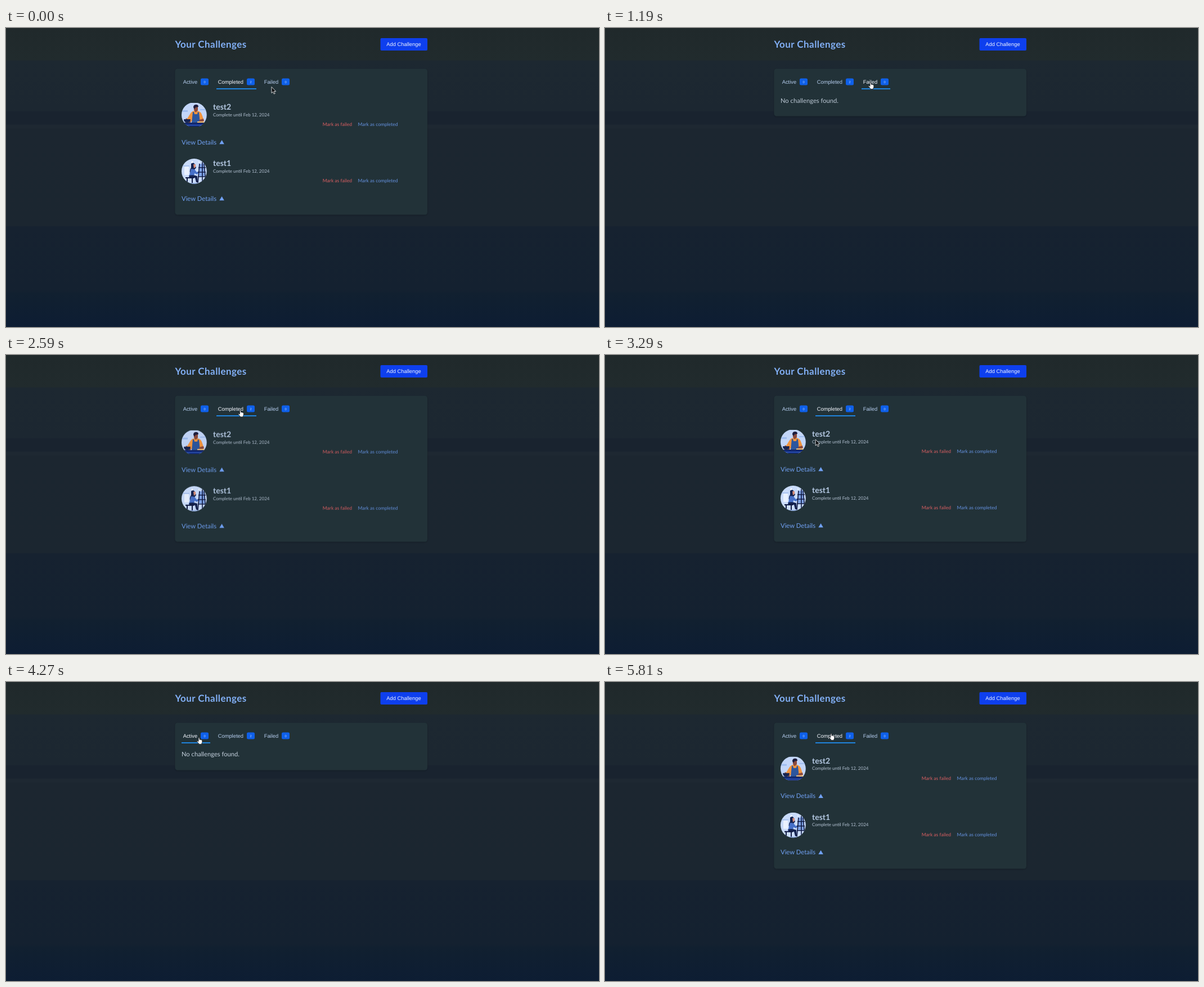
Animation of 1054x531 px, one loop 5880 ms. Source, as an HTML page:

```html
<!DOCTYPE html>
<html lang="en">
<head>
<meta charset="utf-8">
<title>Your Challenges</title>
<style>
  html, body { margin: 0; width: 100%; height: 100%; overflow: hidden; background: #1b2530; }
  svg { display: block; width: 1054px; height: 531px; font-family: Lato, sans-serif; text-rendering: geometricPrecision; }
  .ui { font-family: "Liberation Sans", Arial, sans-serif; font-size: 9.35px; }
  .badge { font-size: 5.8px; fill: #b8d4ff; text-anchor: middle; }
  .title { font-size: 17px; font-weight: 700; letter-spacing: .45px; fill: #82b0f6; }
  .name { font-size: 14px; font-weight: 700; fill: #b4c8e2; }
  .date { font-size: 8px; fill: #b3c1d2; }
  .mark { font-size: 8.5px; }
  .more { font-size: 11.3px; fill: #70a0f2; }
  .none { font-size: 11.2px; fill: #c5d1de; }
</style>
</head>
<body>
<svg viewBox="0 0 1054 531">
  <defs>
    <linearGradient id="bg" gradientUnits="userSpaceOnUse" x1="0" y1="0" x2="0" y2="531"></linearGradient>
    <filter id="shadow" x="-5%" y="-5%" width="110%" height="115%">
      <feDropShadow dx="0" dy="1" stdDeviation="1.5" flood-opacity=".25"/>
    </filter>
    <clipPath id="round"><circle cx="22.4" cy="22.4" r="22.4"/></clipPath>
    <g id="cook" clip-path="url(#round)">
      <path d="M0 1h45v42H0z" fill="#c3d6f9"/>
      <path d="M2 14h9v3H2zM33 12h10v2H33z" fill="#9fbdf0"/>
      <path d="M15 21q3-6 9-6h4q7 1 9 9l3 9-7 2-17-1-8 1q-2-3 2-6z" fill="#f2953f"/>
      <path d="M20 17l2 0 1 4h5l1-4 2 1 2 19H18z" fill="#2c569e"/>
      <path d="M8 28l4 3 5 3-2 3-8-5zM31 31l8-2 1 4-8 3z" fill="#8b4a3c"/>
      <path d="M22 7q4-3 7 1v6q-2 4-5 3-3-3-2-10z" fill="#8b4a3c"/>
      <path d="M21 9q0-5 5-5 4 0 4 4l-5 1-2 3z" fill="#1d1c3d"/>
      <path d="M4 30h12q0 6-6 6T4 30zM2 36h41v3H2z" fill="#172451"/>
      <path d="M28 34h12v2H28z" fill="#f5c27a"/>
      <path d="M0 37h45v6H0z" fill="#122a78"/>
      <path d="M8 40h29v1H8z" fill="#3a67cf"/>
    </g>
    <g id="painter" clip-path="url(#round)">
      <path d="M0 0h45v45H0z" fill="#c9dbfb"/>
      <path d="M5 13h8v16H5z" fill="#e9f1ff"/>
      <path d="M3 12h11v2H3z" fill="#a9c3f0"/>
      <circle cx="19" cy="6" r="1.5" fill="#fff"/><circle cx="31" cy="6" r="1" fill="#fff"/>
      <path d="M17 9q5-4 7 2l2 5-4 5-1 7-6-3q-1-5 2-9z" fill="#14224f"/>
      <path d="M21 10h4v5l-3 2z" fill="#d98f7c"/>
      <path d="M17 18l6 1 4 5 5-2 1 2-6 4-4-2-1 8-9-1z" fill="#4670c8"/>
      <path d="M13 30q8-2 15 1l1 11h-3l-2-8-9 1z" fill="#14224f"/>
      <path d="M7 33h15v2H7zM9 35h2v9H9zM18 35h2v9h-2z" fill="#101a42"/>
      <path d="M31 10l9-2 1 24-11-1z" fill="#7fa3e6"/>
      <path d="M32 9l-3 34M37 6v38M40 9l3 31M30 16h13M29 24h14M29 32h15" fill="none" stroke="#101a42" stroke-width="1.6"/>
      <path d="M0 43h45v2H0z" fill="#8fade4"/>
    </g>
  </defs>
  <rect width="1054" height="531" fill="url(#bg)"/>
  <text class="title" x="300.5" y="35">Your Challenges</text>
  <rect x="665.5" y="18" width="83.5" height="22" rx="2" fill="#0e3fee"/>
  <text class="ui" x="676.3" y="32.2" fill="#eef3ff">Add Challenge</text>
  <rect id="panel" x="300.5" y="72.5" width="448.5" rx="4.5" fill="#203238" filter="url(#shadow)"/>
  <g id="tabs"></g>
  <rect id="line" y="107" height="2" fill="#2083dc"/>
  <g id="list"></g>
  <text id="none" class="none" x="312" y="132">No challenges found.</text>
  <g id="pointer" stroke="#14181c" stroke-width=".8" stroke-linejoin="round" fill="#fff">
    <path id="arrow" stroke="#fff" fill="#0b0d10" d="M0 0v11l2.5-2.3 1.7 3.9 1.9-.8-1.7-3.8h3.3z"/>
    <path id="hand" d="M-1 0q1-1 2 0v3.2q1-.6 1.8.2 1-.4 1.7.5 1.2-.2 1.3 1v2.6q0 1-1 2.6v1.3h-5.200v-1.100l-3.300-3.700q-.3-1.300 1-1.100l1.700 1.100z"/>
  </g>
</svg>
<script>
const $ = id => document.getElementById(id);
const LOOP = 5880;

// offset in px, colour
const bands = [[0, '#20292b'], [57, '#212b2d'], [58, '#1d2831'], [147, '#1c2731'], [149, '#19232f'], [171, '#19232f'],
  [172, '#1e2832'], [178, '#1e2832'], [179, '#1c2630'], [351, '#1b2630'], [353, '#162230'], [465, '#142130'],
  [472, '#11203000'.slice(0, 7)], [531, '#0d1d33']];
$('bg').innerHTML = bands.map(([y, c]) => `<stop offset="${y / 531}" stop-color="${c}"/>`).join('');

const tabs = [
  { label: 'Active', count: 0, x: 312, w: 51 },
  { label: 'Completed', count: 2, x: 374, w: 71 },
  { label: 'Failed', count: 0, x: 456, w: 51 }
];
$('tabs').innerHTML = tabs.map(({ label, count, x, w }) => {
  const right = x + w - 3;
  return `<text class="ui label" x="${x + 2.7}" y="99">${label}</text>
    <rect x="${right - 14}" y="89.500" width="14" height="12" rx="2.500" fill="#0f60e9"/>
    <text class="ui badge" x="${right - 7}" y="97.600">${count}</text>`;
}).join('');
const labels = document.querySelectorAll('.label');

const item = (y, name, art) => `<g transform="translate(312 ${y})">
  <use href="#${art}"/>
  <text class="name" x="56" y="13.200">${name}</text>
  <text class="date" x="56" y="24.500">Complete until Feb 12, 2024</text>
  <text class="mark" x="250.800" y="42.300" fill="#db5f62">Mark as failed</text>
  <text class="mark" x="313.500" y="42.300" fill="#6592e0">Mark as completed</text>
  <text class="more" x="0" y="74.500">View Details</text>
  <path d="M67.300 74.300h8.600l-4.300-7.300z" fill="#70a0f2"/></g>`;
$('list').innerHTML = item(132, 'test2', 'cook') + item(232, 'test1', 'painter');

const clamp = v => Math.min(1, Math.max(0, v));
const mix = (a, b, k) => a + (b - a) * k;

function bezier(x1, y1, x2, y2) {
  const at = (a, b, s) => 3 * (1 - s) ** 2 * s * a + 3 * (1 - s) * s * s * b + s ** 3;
  return x => {
    let lo = 0, hi = 1;
    for (let i = 0; i < 24; i++) {
      const mid = (lo + hi) / 2;
      if (at(x1, x2, mid) < x) lo = mid; else hi = mid;
    }
    return at(y1, y2, lo);
  };
}
const fade = bezier(.25, .1, .35, 1);
const glide = bezier(.4, 0, .1, 1);

// Underdamped spring: stiffness 500, damping 25, mass 1
function spring(ms) {
  const t = ms / 1000, w = Math.sqrt(500 - 12.5 ** 2);
  return 1 - Math.exp(-12.5 * t) * (Math.cos(w * t) + 12.5 / w * Math.sin(w * t));
}

// time, tab
const clicks = [[-2000, 1], [655, 2], [2035, 1], [3633, 0], [5161, 1]];
const EXIT = 310;

// time, x, y of the pointer tip
const path = [[330, 472, 104.5], [640, 472, 97], [1430, 472, 97], [1760, 416.5, 98.5], [3040, 416.5, 98.5],
  [3190, 395, 130], [3280, 375, 152], [3380, 350, 90], [3430, 345, 77], [3520, 343, 99],
  [4300, 343, 99], [4860, 401, 93], [4930, 402, 92]];

function pointerAt(t) {
  const next = path.findIndex(p => p[0] > t);
  if (next < 1) return path.at(next).slice(1);
  const [a, b] = [path[next - 1], path[next]];
  let k = (t - a[0]) / (b[0] - a[0]);
  k = k * k * (3 - 2 * k);
  return [mix(a[1], b[1], k), mix(a[2], b[2], k)];
}

function show(el, visible, y, opacity) {
  el.setAttribute('visibility', visible ? 'visible' : 'hidden');
  el.setAttribute('transform', `translate(0 ${y})`);
  el.setAttribute('opacity', opacity);
}

function draw(t) {
  const n = clicks.findLastIndex(c => c[0] <= t);
  const since = t - clicks[n][0];
  const tab = clicks[n][1], old = n ? clicks[n - 1][1] : tab;
  const leaving = n > 0 && since < EXIT;
  const age = leaving ? since : since - EXIT;
  const isList = (leaving ? old : tab) === 1;

  const away = leaving ? spring(age) : 1 - spring(age);
  const seen = fade(clamp(age / 300));
  const y = -(isList ? 21 : 14) * away, opacity = leaving ? 1 - seen : seen;
  show($('list'), isList, y, opacity);
  show($('none'), !isList, y, opacity);
  $('panel').setAttribute('height', isList ? 259 : 84);

  const k = glide(clamp(since / 450));
  $('line').setAttribute('x', mix(tabs[old].x, tabs[tab].x, k));
  $('line').setAttribute('width', mix(tabs[old].w, tabs[tab].w, k));

  const [px, py] = pointerAt(t);
  const over = tabs.findIndex(({ x, w }) => px > x && px < x + w && py > 82 && py < 104);
  labels.forEach((el, i) => el.setAttribute('fill', i === tab || i === over ? '#f4f8ff' : '#b5cdee'));
  $('pointer').setAttribute('transform', `translate(${px} ${py})`);
  $('arrow').setAttribute('visibility', over < 0 ? 'visible' : 'hidden');
  $('hand').setAttribute('visibility', over < 0 ? 'hidden' : 'visible');
}

const start = performance.now();
function tick() {
  draw((performance.now() - start) % LOOP);
  requestAnimationFrame(tick);
}
tick();
</script>
</body>
</html>
```
